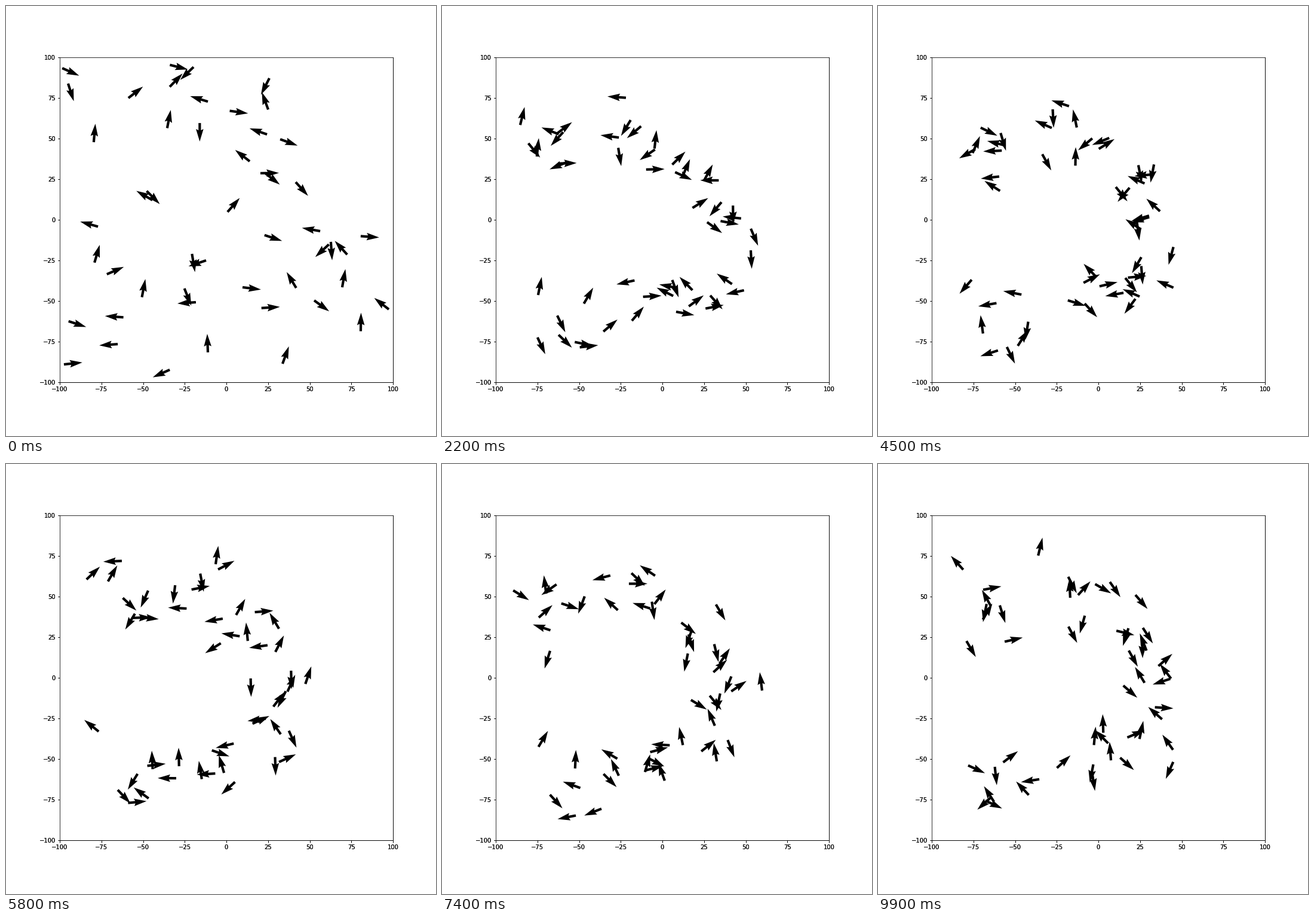
Write a matplotlib script that moves like this. It is 720 px wide and 720 px high and loops after 10000 ms.

```python
import numpy as np
import matplotlib.pyplot as plt
from matplotlib.animation import FuncAnimation

COUNT, FRAMES, INTERVAL = 50, 100, 100
SPEED, MAX_TURN, NOISE = 2.4, 0.34, 0.28

# tail x, tail y, heading in degrees; the rest of the swarm is random
LEADERS = np.array([
    (-98.5, 93.5, -24), (-95, 84, -72), (-58.8, 75.1, 38), (-34, 82, 46),
    (-19.7, 94.2, -136), (-11.1, 72.9, 163), (-16, 59.7, -90), (2, 67.2, -8),
    (25.8, 87.3, -117), (25.1, 68, 110), (24.4, 52.7, 161), (32.3, 49.7, -20),
    (14, 36.1, 142), (23.3, 28.8, -38), (41.6, 23.3, -48), (0.7, 4.9, 49),
    (56.3, -6.9, 170), (62.7, -13.5, -86), (80.6, -10, -4), (69.5, -41.5, 80),
    (97.5, -55.1, 142), (52.7, -49.6, -36), (41.9, -41.9, 121), (33.7, -88.6, 70),
    (9.7, -41.5, -7), (-18.3, -50.7, 184), (-11.1, -81.6, 92), (-34, -92.3, 204),
    (-65.2, -76.5, 184), (-97.5, -89, 6), (-44.4, 12.2, 150), (-79.6, 47.9, 85),
])


def start_pose(rng):
    extra = COUNT - len(LEADERS)
    spots = rng.uniform(-98, 98, (extra, 2))
    pos = np.vstack([LEADERS[:, :2], spots])
    head = np.append(np.radians(LEADERS[:, 2]), rng.uniform(-np.pi, np.pi, extra))
    return pos, head


def find_homes(pos, rng):
    """Scatter gathering points along an open arc, each near its arrow."""
    center, radii = np.array([-40, -10]), np.array([75, 62])
    rel = (pos - center) / radii
    arc = np.clip(np.arctan2(rel[:, 1], rel[:, 0]), np.radians(-110), np.radians(112))
    arc += rng.normal(0, 0.08, len(pos))
    ring = center + radii * np.column_stack([np.cos(arc), np.sin(arc)])
    return ring + rng.normal(0, 9, pos.shape)


def simulate():
    rng = np.random.default_rng(8)
    pos, head = start_pose(rng)
    homes = find_homes(pos, rng)
    track = []
    for _ in range(FRAMES):
        unit = np.column_stack([np.cos(head), np.sin(head)])
        track.append((pos, unit))
        pos = pos + SPEED * unit
        dx, dy = (homes - pos).T
        diff = np.angle(np.exp(1j * (np.arctan2(dy, dx) - head)))
        head = head + np.clip(diff, -MAX_TURN, MAX_TURN) + rng.normal(0, NOISE, COUNT)
    return track


track = simulate()

plt.rcParams["savefig.dpi"] = 72
fig = plt.figure(figsize=(10, 10), dpi=72, facecolor="white")
# two stacked axes give the heavier tick labels
for _ in range(2):
    ax = fig.add_axes([0.125, 0.125, 0.775, 0.755])
    ax.set(xlim=(-100, 100), ylim=(-100, 100))

pos, unit = track[0]
arrows = ax.quiver(*pos.T, *unit.T, color="black", scale=18, width=0.0075)


def update(i):
    pos, unit = track[i]
    arrows.set_offsets(pos)
    arrows.set_UVC(*unit.T)
    return (arrows,)


anim = FuncAnimation(fig, update, frames=FRAMES, interval=INTERVAL,
                     repeat=True, repeat_delay=0, blit=False)
plt.show()
```
